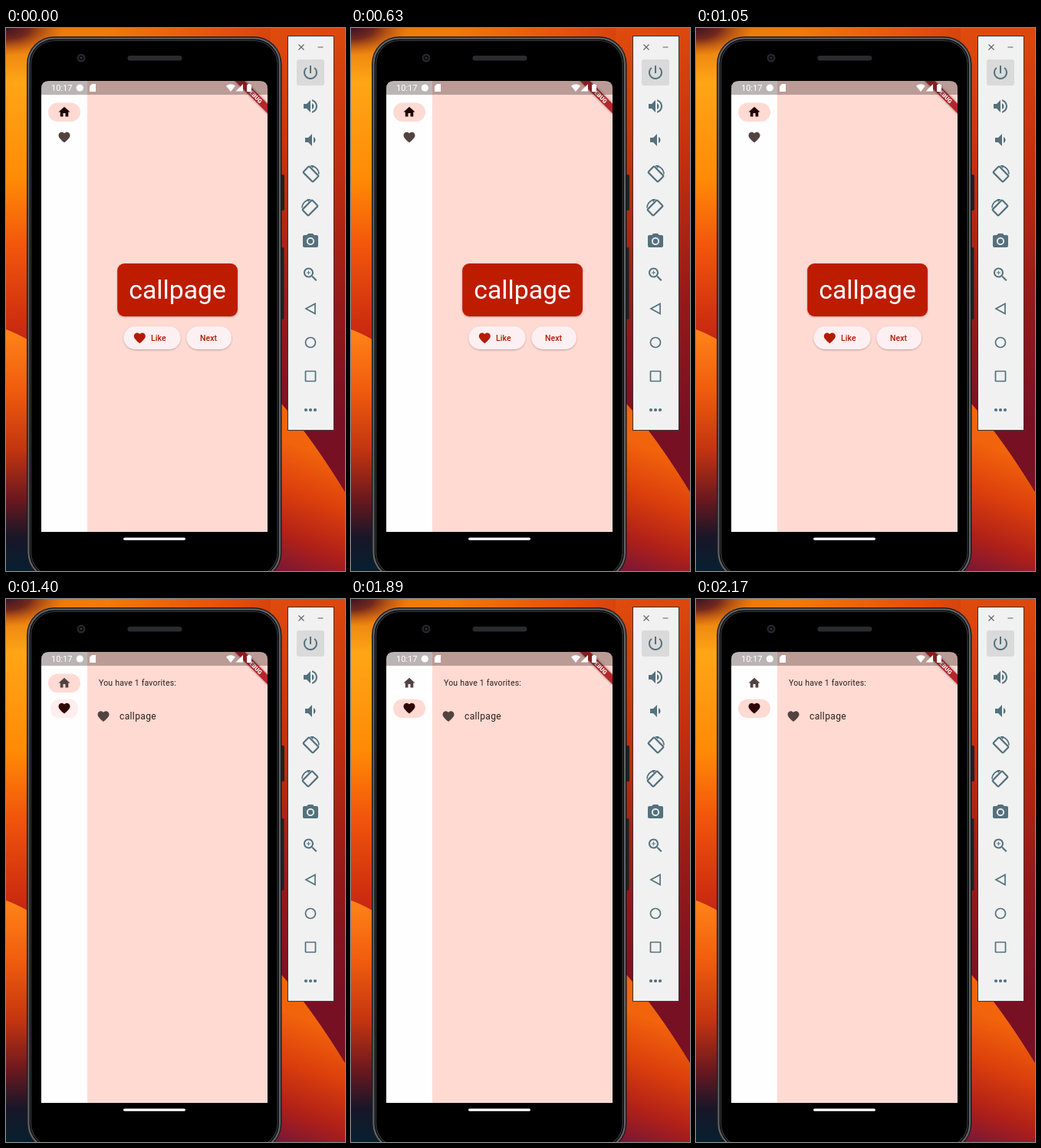
Recreate the animation shown at these times as an HTML page. Size 442 px wide and 708 px high, loop 2.59 s.

```html
<!DOCTYPE html>
<html lang="en">
<head>
<meta charset="utf-8">
<title>Phone emulator</title>
<style>
  html, body { margin: 0; width: 100%; height: 100%; overflow: hidden; background: #000; }
  svg { display: block; width: 442px; height: 708px; }
  text { font-family: Roboto, sans-serif; }
  .label { font-size: 10.5px; font-weight: 500; letter-spacing: .075px; fill: #b31b00; }
  .pill { transform-box: fill-box; transform-origin: center; fill: #ffdad3; }
  .tools { fill: #54717d; }
  .line { fill: none; stroke: #54717d; stroke-width: 1.7; }
</style>
</head>
<body>
<svg viewBox="0 0 442 708" xmlns="http://www.w3.org/2000/svg">
  <defs>
    <linearGradient id="sky" x1="0" y1="0" x2="0" y2="1">
      <stop offset="0" stop-color="#e0700c"/>
      <stop offset=".1" stop-color="#ffa516"/>
      <stop offset=".28" stop-color="#ff8a06"/>
      <stop offset=".4" stop-color="#f2560c"/>
      <stop offset=".58" stop-color="#c42410"/>
    </linearGradient>
    <radialGradient id="corner" gradientUnits="userSpaceOnUse" cx="0" cy="0" r="1" gradientTransform="scale(75 36)">
      <stop offset="0" stop-color="#3c1426"/>
      <stop offset=".4" stop-color="#5c1a20" stop-opacity=".85"/>
      <stop offset="1" stop-color="#c04a10" stop-opacity="0"/>
    </radialGradient>
    <linearGradient id="top" x1="0" y1="0" x2="1" y2="0">
      <stop offset="0" stop-color="#f28a0c" stop-opacity="0"/>
      <stop offset=".3" stop-color="#f07a0c"/>
      <stop offset=".65" stop-color="#e4500c"/>
      <stop offset="1" stop-color="#c0300f"/>
    </linearGradient>
    <linearGradient id="side" gradientUnits="userSpaceOnUse" x1="345" y1="0" x2="470" y2="500">
      <stop offset="0" stop-color="#e04c0c"/>
      <stop offset=".35" stop-color="#c4300e"/>
      <stop offset=".7" stop-color="#961a18"/>
      <stop offset="1" stop-color="#781024"/>
    </linearGradient>
    <linearGradient id="wave" gradientUnits="userSpaceOnUse" x1="0" y1="393" x2="0" y2="708">
      <stop offset="0" stop-color="#ff8418"/>
      <stop offset=".25" stop-color="#f05c0e"/>
      <stop offset=".5" stop-color="#c23410"/>
      <stop offset=".7" stop-color="#6c181e"/>
      <stop offset=".86" stop-color="#181628"/>
      <stop offset="1" stop-color="#06202f"/>
    </linearGradient>
    <linearGradient id="slope" gradientUnits="userSpaceOnUse" x1="412" y1="555" x2="352" y2="712">
      <stop offset="0" stop-color="#f2640c"/>
      <stop offset=".35" stop-color="#dc400c"/>
      <stop offset=".7" stop-color="#b02018"/>
      <stop offset="1" stop-color="#741638"/>
    </linearGradient>
    <filter id="soft" x="-20%" y="-30%" width="140%" height="170%">
      <feDropShadow dx="0" dy="1" stdDeviation=".8" flood-opacity=".28"/>
    </filter>
    <filter id="glow" x="-20%" y="-80%" width="140%" height="260%">
      <feDropShadow dx="0" dy="0" stdDeviation="1.6" flood-opacity=".5"/>
    </filter>
    <clipPath id="screen"><path d="M46 657V79q0-10 10-10h275q10 0 10 10v578z"/></clipPath>
    <path id="home" d="M10 20v-6h4v6h5v-8h3L12 3 2 12h3v8z"/>
    <path id="heart" d="M12 21.35l-1.45-1.32C5.4 15.36 2 12.28 2 8.5 2 5.42 4.42 3 7.5 3c1.74 0 3.41.81 4.5 2.09C13.09 3.81 14.76 3 16.5 3 19.58 3 22 5.42 22 8.5c0 3.78-3.4 6.86-8.55 11.54z"/>
    <g id="rotate">
      <rect x="-9" y="-5.500" width="18" height="11" rx="1.200" transform="rotate(45)" fill="none" stroke="#54717d" stroke-width="2.200"/>
      <path d="M0-10.500A10.500 10.500 0 0 1 10.500 0" fill="none" stroke="#54717d" stroke-width="1.600"/>
      <path d="M-1-11.500h5l-1.500 4z"/>
    </g>
  </defs>

  <!-- wallpaper -->
  <rect width="442" height="708" fill="url(#sky)"/>
  <rect width="442" height="34" fill="url(#top)"/>
  <rect width="80" height="40" fill="url(#corner)"/>
  <rect x="345" width="97" height="708" fill="url(#side)"/>
  <path d="M0 393Q20 400 60 425V708H0z" fill="url(#wave)"/>
  <path d="M345 475Q390 520 442 605V708H345z" fill="url(#slope)"/>

  <!-- phone -->
  <rect x="358" y="191" width="5" height="47" rx="2" fill="#202124"/>
  <rect x="358" y="286" width="4.500" height="94" rx="2" fill="#202124"/>
  <rect x="27" y="11" width="332.500" height="709" rx="36" fill="#1c1d1f"/>
  <rect x="29.500" y="13.500" width="327.500" height="704" rx="33.500" fill="#0a0a0b" stroke="#63666b" stroke-width="2"/>
  <rect x="32.500" y="16.500" width="321.500" height="698" rx="30.500" fill="#000" stroke="#36393d" stroke-width="1.200"/>
  <circle cx="98" cy="39" r="5.500" fill="#26282b"/>
  <circle cx="98" cy="39" r="3.300" fill="#0b0d12"/>
  <circle cx="98" cy="39" r="1.300" fill="#343a44"/>
  <rect x="158.500" y="36" width="71" height="6.500" rx="3.200" fill="#2a2b2e"/>
  <rect x="153" y="664.500" width="81" height="3.200" rx="1.600" fill="#fff"/>

  <g clip-path="url(#screen)">
    <rect x="46" y="69" width="60" height="588" fill="#fffeff"/>
    <rect x="106" y="69" width="235" height="588" fill="#ffdad3"/>

    <rect class="pill" id="homePill" x="55" y="97.500" width="42" height="24.500" rx="12.250"/>
    <rect class="pill" id="heartPill" x="55" y="130.500" width="42" height="24.500" rx="12.250"/>
    <use id="homeIcon" href="#home" transform="translate(67 100.500) scale(.75)"/>
    <use id="heartIcon" href="#heart" transform="translate(67 133.500) scale(.75)"/>

    <g id="wordPage">
      <rect x="145.200" y="307" width="156.800" height="69" rx="9" fill="#be1c00" filter="url(#soft)"/>
      <text x="160.300" y="353" font-size="33.750" fill="#fff">callpage</text>
      <g fill="#fdf0f2" filter="url(#soft)">
        <rect x="153.500" y="389" width="74" height="30" rx="15"/>
        <rect x="235.500" y="389" width="58.500" height="30" rx="15"/>
      </g>
      <use href="#heart" transform="translate(165.300 395.300) scale(.75)" fill="#b31b00"/>
      <text class="label" x="189" y="408">Like</text>
      <text class="label" x="253" y="408">Next</text>
    </g>

    <g id="listPage" fill="#2a1c19">
      <text x="121" y="113" font-size="10.500" letter-spacing=".2">You have 1 favorites:</text>
      <use href="#heart" transform="translate(118 144) scale(.75)" fill="#534340"/>
      <text x="148" y="157" font-size="12" letter-spacing=".375">callpage</text>
    </g>

    <g transform="translate(341 69) rotate(45)">
      <rect x="-32" y="21" width="64" height="9" fill="#b3282a" filter="url(#glow)"/>
      <text x="1.500" y="28.200" font-size="7.650" font-weight="900" text-anchor="middle" fill="#fff">DEBUG</text>
    </g>

    <!-- status bar -->
    <rect x="46" y="69" width="295" height="18" fill="#200c0c" fill-opacity=".3"/>
    <g fill="#fff">
      <text x="59" y="82" font-size="11">10:17</text>
      <circle cx="96.300" cy="78" r="4.600"/>
      <path d="M112 73h5v10h-8v-7z"/>
      <path d="M287 75.500Q293 71 299 75.500L293 83z"/>
      <path d="M309 73V82.500H299.500z"/>
      <path d="M314 74h1.500v-1h3v1h1.500v9h-6z"/>
    </g>
  </g>

  <!-- tool panel -->
  <rect x="367.500" y="10.500" width="60" height="514" fill="#f1f1f1" stroke="#3a3436"/>
  <path d="M381.500 21.500l7 7m0-7l-7 7M406.500 25h7" fill="none" stroke="#5a6469" stroke-width="1.100"/>
  <rect x="379" y="41" width="36" height="34" rx="3" fill="#dadada"/>
  <g class="tools" id="tools">
    <use href="#rotate" transform="translate(397.500 190.500)"/>
    <use href="#rotate" transform="translate(396.500 234.500) scale(-1 1)"/>
    <circle cx="397" cy="278" r="3.200"/>
    <circle cx="391" cy="498" r="2.100"/>
    <circle cx="397" cy="498" r="2.100"/>
    <circle cx="403" cy="498" r="2.100"/>
  </g>
  <g class="line">
    <path d="M391 366l12-6.500v13z"/>
    <circle cx="397" cy="410" r="6.500"/>
    <rect x="390.500" y="447.500" width="13" height="13" rx=".5"/>
  </g>
</svg>
<script>
const $ = id => document.getElementById(id);

// Solid 24-unit icons of the tool panel: centre y, path
const icons = [
  [58, "M13 3h-2v10h2zm4.83 2.17l-1.42 1.42C17.99 7.86 19 9.81 19 12c0 3.87-3.13 7-7 7s-7-3.13-7-7c0-2.19 1.01-4.14 2.58-5.42L6.17 5.17C4.23 6.82 3 9.26 3 12c0 4.97 4.03 9 9 9s9-4.03 9-9c0-2.74-1.23-5.18-3.17-6.83z"],
  [102, "M3 9v6h4l5 5V4L7 9zm13.5 3c0-1.77-1.02-3.29-2.5-4.03v8.05c1.48-.73 2.5-2.25 2.5-4.02zM14 3.23v2.06c2.89.86 5 3.54 5 6.71s-2.11 5.85-5 6.71v2.06c4.01-.91 7-4.49 7-8.77s-2.99-7.86-7-8.77z"],
  [146, "M18.5 12c0-1.77-1.02-3.29-2.5-4.03v8.05c1.48-.73 2.5-2.25 2.5-4.02zM5 9v6h4l5 5V4L9 9z"],
  [278, "M9 2L7.17 4H4c-1.1 0-2 .9-2 2v12c0 1.1.9 2 2 2h16c1.1 0 2-.9 2-2V6c0-1.1-.9-2-2-2h-3.17L15 2zm3 15c-2.76 0-5-2.24-5-5s2.24-5 5-5 5 2.24 5 5-2.24 5-5 5z"],
  [321.5, "M15.5 14h-.79l-.28-.27C15.41 12.59 16 11.11 16 9.5 16 5.91 13.09 3 9.5 3S3 5.91 3 9.5 5.91 16 9.5 16c1.61 0 3.09-.59 4.23-1.57l.27.28v.79l5 4.99L20.49 19zm-6 0C7.01 14 5 11.99 5 9.5S7.01 5 9.5 5 14 7.01 14 9.5 11.99 14 9.5 14zm.5-7H9v2H7v1h2v2h1v-2h2V9h-2z"]
];
for (const [y, d] of icons) {
  const path = document.createElementNS("http://www.w3.org/2000/svg", "path");
  path.setAttribute("d", d);
  path.setAttribute("transform", `translate(385 ${y - 12})`);
  $("tools").append(path);
}

const LOOP = 2590, TAP = 1400, STEP = 70;

// Hold each style from its time until the next one
function hold(id, steps) {
  const frames = steps.map(([t, style]) => ({ ...style, offset: t / LOOP, easing: "step-end" }));
  frames.push({ ...steps.at(-1)[1], offset: 1 });
  const anim = $(id).animate(frames, { duration: LOOP, iterations: Infinity });
  anim.startTime = document.timeline.currentTime ?? 0;
}
const swap = (id, key, before, after) =>
  hold(id, [[0, { [key]: before }], [TAP, { [key]: after }]]);
const pill = (opacity, width) => ({ opacity, transform: `scaleX(${width})` });

swap("wordPage", "visibility", "visible", "hidden");
swap("listPage", "visibility", "hidden", "visible");
swap("homeIcon", "fill", "#1d0604", "#534340");
swap("heartIcon", "fill", "#534340", "#2d0706");
hold("homePill", [[0, pill(1, 1)], [TAP + STEP, pill(.6, .85)], [TAP + 2 * STEP, pill(0, .4)]]);
hold("heartPill", [[0, pill(0, .4)], [TAP, pill(.42, .86)], [TAP + STEP, pill(1, .97)], [TAP + 2 * STEP, pill(1, 1)]]);
</script>
</body>
</html>
```
